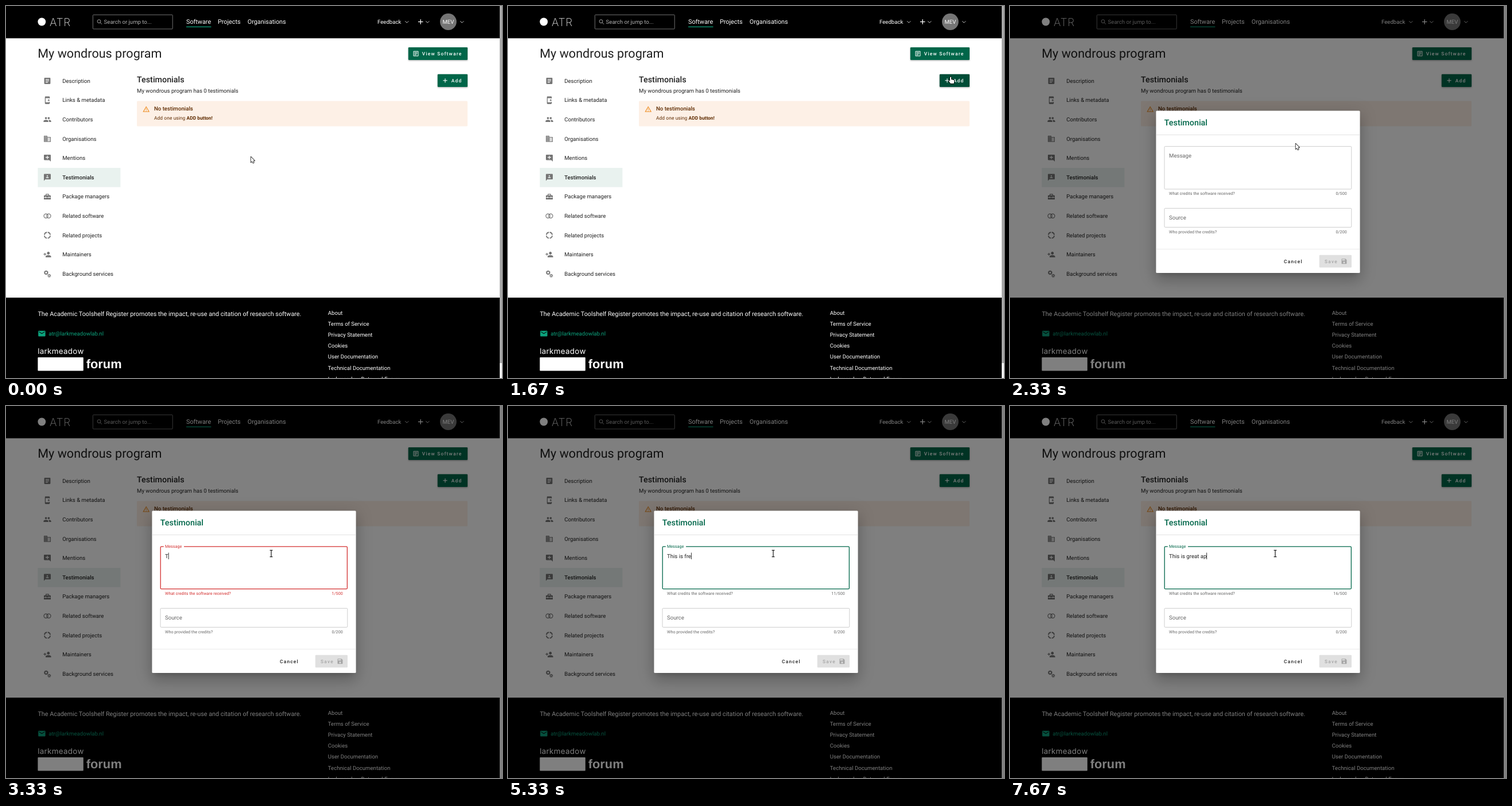
These frames come from a looping animation (864 by 648 pixels, 8000 ms). An HTML page with a canvas:

```html
<!DOCTYPE html>
<html lang="en">
<head>
<meta charset="utf-8">
<title>Testimonials</title>
<style>
html, body { margin: 0; width: 100%; height: 100%; overflow: hidden; background: #fff; }
canvas { display: block; }
</style>
</head>
<body>
<canvas id="stage" width="864" height="648"></canvas>
<script>
const W = 864, H = 648, LOOP = 8000, STEPS = 24;
const GREEN = '#006649', RED = '#d32f2f', TEAL = '#0ca27c', INK = '#212121', GREY = '#757575';
const ROBOTO = 'Roboto, sans-serif';
const stage = document.getElementById('stage').getContext('2d');
const layer = Object.assign(document.createElement('canvas'), { width: W, height: H }).getContext('2d');
let c = stage;

const ICONS = {
  article: 'M19 3H5c-1.1 0-2 .9-2 2v14c0 1.1.9 2 2 2h14c1.1 0 2-.9 2-2V5c0-1.1-.9-2-2-2m-5 14H7v-2h7zm3-4H7v-2h10zm0-4H7V7h10z',
  page: 'M19 5v14H5V5zM19 3H5c-1.1 0-2 .9-2 2v14c0 1.1.9 2 2 2h14c1.1 0 2-.9 2-2V5c0-1.1-.9-2-2-2M14 17H7v-2h7zM17 13H7v-2h10zM17 9H7V7h10z',
  phone: 'M17 18H7V6h10v1h2V3c0-1.1-.9-2-2-2H7c-1.1 0-2 .9-2 2v18c0 1.1.9 2 2 2h10c1.1 0 2-.9 2-2v-4h-2zM16 8l1.2 2.8 2.8 1.2-2.8 1.2-1.2 2.8-1.2-2.8-2.8-1.2 2.8-1.2z',
  people: 'M16 11c1.66 0 3-1.34 3-3s-1.34-3-3-3-3 1.34-3 3 1.34 3 3 3m-8 0c1.66 0 3-1.34 3-3S9.66 5 8 5 5 6.34 5 8s1.34 3 3 3m0 2c-2.33 0-7 1.17-7 3.5V19h14v-2.5c0-2.33-4.67-3.5-7-3.5m8 0c-.29 0-.62.02-.97.05 1.16.84 1.97 1.97 1.97 3.45V19h6v-2.5c0-2.33-4.67-3.5-7-3.5',
  building: 'M12 7V3H2v18h20V7zM6 19H4v-2h2zm0-4H4v-2h2zm0-4H4V9h2zm0-4H4V5h2zm4 12H8v-2h2zm0-4H8v-2h2zm0-4H8V9h2zm0-4H8V5h2zm10 12h-8v-2h2v-2h-2v-2h2v-2h-2V9h8zm-2-8h-2v2h2zm0 4h-2v2h2z',
  comment: 'M22 4c0-1.1-.9-2-2-2H4c-1.1 0-2 .9-2 2v12c0 1.1.9 2 2 2h14l4 4zm-5 7h-4v4h-2v-4H7V9h4V5h2v4h4z',
  quote: 'M20 2H4c-1.1 0-2 .9-2 2v18l4-4h14c1.1 0 2-.9 2-2V4c0-1.1-.9-2-2-2m-8 4c1.1 0 2 .9 2 2s-.9 2-2 2-2-.9-2-2 .9-2 2-2m4 8H8v-.57c0-.81.48-1.53 1.22-1.85.85-.37 1.79-.58 2.78-.58s1.93.21 2.78.58c.74.32 1.22 1.04 1.22 1.85z',
  toolbox: 'M18 16h-2v-1H8v1H6v-1H2v5h20v-5h-4zm2-8h-3V6c0-1.1-.9-2-2-2H9c-1.1 0-2 .9-2 2v2H4c-1.1 0-2 .9-2 2v4h4v-2h2v2h8v-2h2v2h4v-4c0-1.1-.9-2-2-2m-5 0H9V6h6z',
  person: 'M15 12c2.21 0 4-1.79 4-4s-1.79-4-4-4-4 1.79-4 4 1.79 4 4 4m-9-2V7H4v3H1v2h3v3h2v-3h3v-2zm9 4c-2.67 0-8 1.34-8 4v2h16v-2c0-2.66-5.33-4-8-4',
  save: 'M17 3H5c-1.11 0-2 .9-2 2v14c0 1.1.89 2 2 2h14c1.1 0 2-.9 2-2V7zm-5 16c-1.66 0-3-1.34-3-3s1.34-3 3-3 3 1.34 3 3-1.34 3-3 3m3-10H5V5h10z',
  warning: 'M12 5.99 19.53 19H4.47zM12 2 1 21h22zm1 14h-2v2h2zm0-6h-2v4h2z',
  mail: 'M20 4H4c-1.1 0-2 .9-2 2v12c0 1.1.9 2 2 2h16c1.1 0 2-.9 2-2V6c0-1.1-.9-2-2-2m0 4-8 5-8-5V6l8 5 8-5z'
};

const MENU = [
  ['Description', 'article'], ['Links & metadata', 'phone'], ['Contributors', 'people'],
  ['Organisations', 'building'], ['Mentions', 'comment'], ['Testimonials', 'quote'],
  ['Package managers', 'toolbox'], ['Related software', drawRings], ['Related projects', drawSegments],
  ['Maintainers', 'person'], ['Background services', drawGears]
];
const LINKS = ['About', 'Terms of Service', 'Privacy Statement', 'Cookies',
  'User Documentation', 'Technical Documentation', 'Larkmeadow DataworkForum'];

// One entry per step of a third of a second
const POINTER = [[426, 262], [416, 260], [296, 185], [496, 234], [727, 161], [771, 124], [771, 123], [497, 239]];
const TYPED = ['T', 'Th', 'This ', 'This is ', 'This is fre', 'This is freat ', 'This is fre',
  'This is ', 'This is ', 'This is ', 'This is gre', 'This is great', 'This is great ', 'This is great ap'];
const HOVER = 5, OPENING = 6, FOCUS = 8, TYPING = 10;

function rect(x, y, w, h, fill, r = 0) {
  c.fillStyle = fill;
  c.beginPath();
  c.roundRect(x, y, w, h, r);
  c.fill();
}

function frame(x, y, w, h, color, lw, r = 0) {
  c.strokeStyle = color;
  c.lineWidth = lw;
  c.beginPath();
  c.roundRect(x, y, w, h, r);
  c.stroke();
}

function disc(x, y, r, fill) {
  c.fillStyle = fill;
  c.beginPath();
  c.arc(x, y, r, 0, 7);
  c.fill();
}

function line(points, color, lw) {
  c.strokeStyle = color;
  c.lineWidth = lw;
  c.beginPath();
  points.forEach(([x, y], i) => i ? c.lineTo(x, y) : c.moveTo(x, y));
  c.stroke();
}

function text(s, x, y, size, color, o = {}) {
  c.font = `${o.weight || 400} ${size}px ${o.family || ROBOTO}`;
  c.letterSpacing = (o.space || 0) + 'px';
  c.textAlign = o.align || 'left';
  c.textRendering = 'geometricPrecision';
  c.fillStyle = color;
  c.fillText(s, x, y);
  return c.measureText(s).width;
}

// Shadow alone, cast by a shape that lies off the stage
function shadow(x, y, w, h, dy, blur, spread, alpha) {
  c.save();
  c.shadowColor = `rgba(0,0,0,${alpha})`;
  c.shadowBlur = blur;
  c.shadowOffsetX = 2000;
  c.shadowOffsetY = dy;
  c.fillStyle = '#000';
  c.fillRect(x - 2000 - spread, y - spread, w + 2 * spread, h + 2 * spread);
  c.restore();
}

function icon(shape, x, y, scale, color) {
  c.save();
  c.translate(x - 12 * scale, y - 12 * scale);
  c.scale(scale, scale);
  c.fillStyle = c.strokeStyle = color;
  if (typeof shape === 'function') shape();
  else c.fill(new Path2D(ICONS[shape]), 'evenodd');
  c.restore();
}

function ring(x, y, r, lw, dash = []) {
  c.lineWidth = lw;
  c.setLineDash(dash);
  c.beginPath();
  c.arc(x, y, r, 0, Math.PI * 2);
  c.stroke();
}

function drawRings() {
  ring(8, 12, 6, 2);
  ring(16, 12, 6, 2);
}

function drawSegments() {
  for (let i = 0; i < 4; i++) {
    c.lineWidth = 3;
    c.beginPath();
    c.arc(12, 12, 8.5, i * Math.PI / 2 + .14, (i + 1) * Math.PI / 2 - .14);
    c.stroke();
  }
}

function drawGears() {
  [[8.5, 8.5, 4], [17.5, 17.5, 2.7]].forEach(([x, y, r]) => {
    const tooth = Math.PI * (r + 1.6) / 8;
    ring(x, y, r, r * .7);
    ring(x, y, r + 1.6, 1.8, [tooth, tooth]);
  });
}

function chevron(x, y) {
  line([[x - 3, y - 1.5], [x, y + 1.5], [x + 3, y - 1.5]], '#ddd', .9);
}

function plus(x, y, r, lw, color) {
  line([[x - r, y], [x + r, y]], color, lw);
  line([[x, y - r], [x, y + r]], color, lw);
}

function button(x, y, w, h, fill) {
  shadow(x, y, w, h, 1.2, 2.5, 0, .35);
  rect(x, y, w, h, fill, 1.2);
}

function drawHeader() {
  rect(0, 0, 860, 56.2, '#000');
  disc(62.3, 27.5, 6.9, '#fff');
  text('ATR', 76, 34.6, 19, '#e6e6e6', { family: 'Inter, sans-serif', weight: 200, space: .8 });
  frame(151.4, 15.4, 138.8, 24.6, '#8c8c8c', .8, 1);
  c.strokeStyle = '#b4b4b4';
  ring(162, 26.7, 2.9, .9);
  line([[164.2, 28.9], [167, 31.8]], '#b4b4b4', .9);
  text('Search or jump to...', 170.6, 30.9, 9.6, '#b0b0b0');
  text('Software', 314, 31.3, 10.8, '#fff');
  text('Projects', 369, 31.3, 10.8, '#fff');
  text('Organisations', 420.8, 31.3, 10.8, '#fff');
  rect(314, 35.8, 43.4, 1.1, TEAL);
  text('Feedback', 647, 30.9, 9.6, '#fff');
  chevron(698.3, 27.8);
  plus(722.2, 27.5, 4.3, 1.3, '#fff');
  chevron(734.3, 27.8);
  disc(770.4, 27.5, 14.4, GREY);
  text('MEV', 770.4, 30.9, 9.6, '#fff', { align: 'center' });
  chevron(794.3, 27.8);
}

function drawMenu() {
  rect(55.4, 282, 144, 33.6, '#e9f2ef');
  MENU.forEach(([label, shape], i) => {
    const y = 130.5 + i * 33.6;
    icon(shape, 72, y, .6, GREY);
    text(label, 98.2, y + 3.3, 9.6, INK, { weight: i === 5 ? 500 : 400 });
  });
}

function drawAdd(step) {
  const over = step === HOVER || step === OPENING;
  button(751.8, 118.8, 52.2, 22.2, over ? '#004d37' : GREEN);
  if (step === OPENING) {
    c.save();
    c.beginPath();
    c.rect(751.8, 118.8, 52.2, 22.2);
    c.clip();
    disc(771, 129, 26.5, 'rgba(255,255,255,.3)');
    c.restore();
  }
  plus(765, 129.8, 3.6, 1.1, '#fff');
  text('Add', 775.8, 132.8, 8.4, '#fff', { weight: 500, space: 1.2 });
}

function drawFooter() {
  rect(0, 508, 860, 140, '#000');
  text('The Academic Toolshelf Register promotes the impact, re-use and citation of research software.',
    55.4, 539.5, 10.8, '#fff');
  icon('mail', 62.4, 570.6, .62, TEAL);
  text('atr@larkmeadowlab.nl', 74.2, 573.6, 9.6, TEAL);
  const wordmark = { family: 'Inter, sans-serif', weight: 400, space: .3 };
  text('larkmeadow', 55.2, 606.3, 13.4, '#fff', wordmark);
  rect(55.4, 612, 79.4, 23.4, '#fff', 1);
  text('forum', 139.8, 631, 21.8, '#fff', { family: '"Liberation Sans", sans-serif', weight: 700 });
  LINKS.forEach((s, i) => text(s, 560.8, 537.6 + i * 19.22, 9.6, '#fff'));
}

function drawPage(step) {
  rect(0, 0, W, H, '#fff');
  drawHeader();
  text('My wondrous program', 55.2, 90.2, 21.6, INK);
  button(700.8, 72, 103.2, 22, GREEN);
  icon('page', 714, 83, .5, '#fff');
  text('View Software', 724.8, 86, 8.4, '#fff', { weight: 500, space: 1.2 });
  drawMenu();
  text('Testimonials', 228, 133.3, 14.3, INK, { weight: 500 });
  text('My wondrous program has 0 testimonials', 228, 151.2, 9.6, INK);
  drawAdd(step);
  rect(228, 165.4, 576, 44.2, '#fdf0e6', 1.5);
  icon('warning', 244.2, 179.8, .53, '#ed8a1c');
  text('No testimonials', 258, 182.4, 9.6, '#5f2b01', { weight: 500 });
  const w = text('Add one using ', 258, 198.4, 8.4, '#5f2b01', { space: .09 });
  text('ADD button!', 258 + w, 198.4, 8.4, '#5f2b01', { weight: 700 });
  drawFooter();
  if (step < OPENING) {
    rect(860, 0, 4, H, '#f0f0f0');
    rect(860, 0, 4, 622, '#a8a8a8');
  }
}

function drawMessage(step) {
  const typed = step < TYPING ? '' : TYPED[step - TYPING];
  const invalid = typed.length === 1, focused = step >= FOCUS;
  const accent = invalid ? RED : GREEN;
  if (focused) frame(269.2, 244.9, 325.2, 73.8, accent, 1.3, 1.5);
  else frame(269, 244.6, 325.8, 74.4, '#c0c0c0', .8, 1.5);

  if (!focused) text('Message', 277, 264, 9.6, '#666');
  else if (step === FOCUS) text('Message', 277, 259.2, 8.93, '#47645c');
  else {
    rect(274.8, 243, 35.2, 4, '#fff');
    text('Message', 277, 246.7, 7.2, accent);
  }

  const w = text(typed, 277, 264.8, 9.6, INK);
  const blinkOff = step === 17 || step === 18;
  if (focused && !blinkOff) rect(277 + w, 255.4, .8, 11.6, '#000');

  const hint = invalid ? RED : '#666';
  text('What credits the software received?', 277, 328.9, 7.2, hint, { space: .02 });
  text(typed.length + '/500', 587, 328.9, 7.2, hint, { align: 'right', space: .1 });
}

function drawDialog(step) {
  const x = 254.4, y = 182.4, w = 355.2, h = 282.6;
  shadow(x, y, w, h, 6.6, 9, -4.2, .2);
  shadow(x, y, w, h, 14.4, 22.8, 1.8, .14);
  shadow(x, y, w, h, 5.4, 27.6, 4.8, .12);
  rect(x, y, w, h, '#fff', 1.5);
  text('Testimonial', 268.8, 208.2, 14.3, GREEN, { weight: 500 });
  rect(x, 224.2, w, .7, '#d8d8d8');
  rect(x, 423.4, w, .7, '#d8d8d8');
  drawMessage(step);
  frame(269, 352.4, 325.8, 33, '#c0c0c0', .8, 1.5);
  text('Source', 277, 372.2, 9.6, '#666');
  text('Who provided the credits?', 277, 395.5, 7.2, '#666', { space: .02 });
  text('0/200', 587, 395.5, 7.2, '#666', { align: 'right', space: .1 });
  text('Cancel', 477, 447.6, 8.4, INK, { weight: 500, space: 1.2 });
  rect(538.8, 433.8, 56.2, 21.6, '#e0e0e0', 1.2);
  text('Save', 548, 447.6, 8.4, '#a6a6a6', { weight: 500, space: 1.2 });
  icon('save', 582, 444.8, .5, '#a6a6a6');
}

function outlined(path, x, y) {
  c.save();
  c.translate(x, y);
  c.lineJoin = 'round';
  c.lineWidth = 1.5;
  c.strokeStyle = '#000';
  c.fillStyle = '#fff';
  c.stroke(path);
  c.fill(path);
  c.restore();
}

const ARROW = new Path2D('M.6.8V10.2L2.8 8.2 4.3 11.5 5.8 10.8 4.4 7.5H7.2z');
const HAND = new Path2D('M-1 0Q0-1 1 0V4L5.5 5Q6.5 5.4 6.4 6.6L5.6 11H0L-3 7Q-3.6 5.6-2.4 5.6L-1 7z');

function drawPointer(step) {
  if (step >= FOCUS) {
    const [x, y] = [462, 257];
    [['#fff', 2.2], ['#000', 1.1]].forEach(([color, lw]) => {
      line([[x, y - 5.5], [x, y + 5.5]], color, lw);
      line([[x - 2.4, y - 5.7], [x + 2.4, y - 5.7]], color, lw);
      line([[x - 2.4, y + 5.7], [x + 2.4, y + 5.7]], color, lw);
    });
  } else outlined(step === HOVER ? HAND : ARROW, ...POINTER[step]);
}

function draw(t) {
  let step = STEPS - 1;
  while (Math.round(step * 100 / 3) * 10 > t) step--;
  drawPage(step);
  if (step >= OPENING) {
    const shown = step === OPENING ? .78 : 1;
    rect(0, 0, W, H, `rgba(0,0,0,${.5 * shown})`);
    c = layer;
    c.clearRect(0, 0, W, H);
    drawDialog(step);
    c = stage;
    c.globalAlpha = shown;
    c.drawImage(layer.canvas, 0, 0);
    c.globalAlpha = 1;
  }
  drawPointer(step);
}

const start = performance.now();
function tick() {
  draw((performance.now() - start) % LOOP);
  requestAnimationFrame(tick);
}
tick();
</script>
</body>
</html>
```
